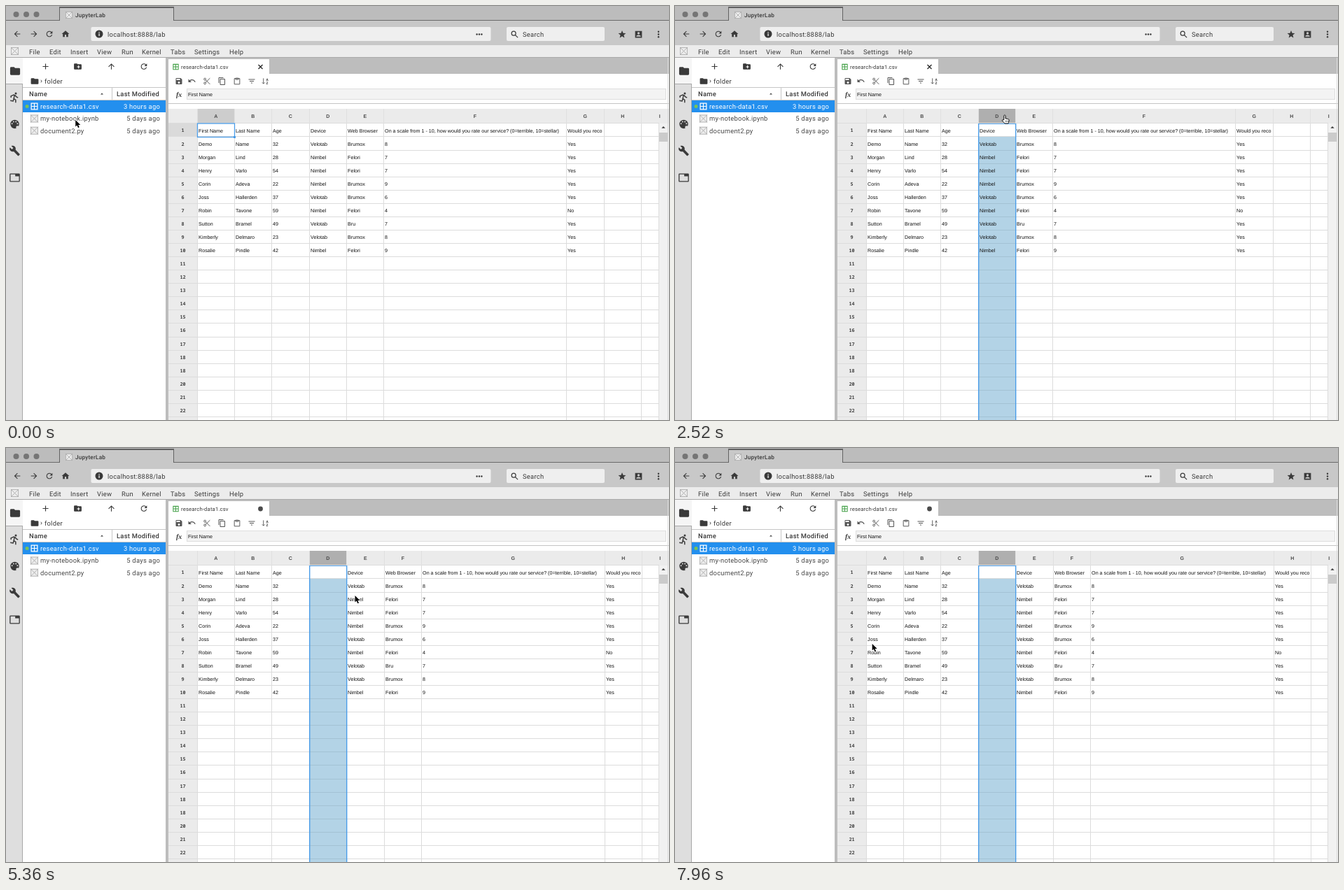
Animation, 947 px wide and 592 px high, one loop 8000 ms. Source, as an HTML page with a canvas:

```html
<!DOCTYPE html>
<html lang="en">
<head>
<meta charset="utf-8">
<title>Spreadsheet column insert</title>
<style>
html, body { margin: 0; width: 100%; height: 100%; overflow: hidden; background: #fff; }
canvas { display: block; }
</style>
</head>
<body>
<canvas id="stage" width="947" height="592"></canvas>
<script>
const ctx = document.getElementById('stage').getContext('2d');
const LOOP = 8000, STEP = 40;
const SELECT = 2240, MENU = 2640, INSERT = 5280;
const UI = 'Roboto, sans-serif';
const SHEET = '"Liberation Sans", "DejaVu Sans", sans-serif';
const MONO = '"Noto Sans Mono", monospace';
const INK = '#3a3a3a', LINE = '#dcdcdc', BLUE = '#4b9de8';

// ---------- helpers ----------
function box(x, y, w, h, color) {
  ctx.fillStyle = color;
  ctx.fillRect(x, y, w, h);
}

function frame(x, y, w, h, color, width = 1) {
  ctx.strokeStyle = color;
  ctx.lineWidth = width;
  ctx.strokeRect(x, y, w, h);
}

function round(x, y, w, h, r, color) {
  ctx.fillStyle = color;
  ctx.beginPath();
  ctx.roundRect(x, y, w, h, r);
  ctx.fill();
}

function dot(x, y, r, color) {
  ctx.fillStyle = color;
  ctx.beginPath();
  ctx.arc(x, y, r, 0, 7);
  ctx.fill();
}

// y is the middle of the capitals
function text(str, x, y, { size = 9.4, gap = 0.25, font = UI, weight = 400, color = INK, align = 'left' } = {}) {
  ctx.font = `${weight} ${size}px ${font}`;
  ctx.letterSpacing = gap + 'px';
  ctx.textAlign = align;
  ctx.fillStyle = color;
  ctx.fillText(str, x, y + size * 0.36);
}

const cellText = (str, x, y) => text(str, x, y, { size: 7.15, gap: 0, font: SHEET, color: '#111' });

// Icons live on a 24 unit grid, centred on x, y
function icon(d, x, y, size, { color = INK, stroke = 0 } = {}) {
  const path = new Path2D(d);
  ctx.save();
  ctx.translate(x - size / 2, y - size / 2);
  ctx.scale(size / 24, size / 24);
  if (stroke) {
    ctx.strokeStyle = color;
    ctx.lineWidth = stroke;
    ctx.stroke(path);
  } else {
    ctx.fillStyle = color;
    ctx.fill(path, 'evenodd');
  }
  ctx.restore();
}

function placeholder(x, y, s) {
  box(x, y, s, s, '#ececec');
  frame(x + 0.5, y + 0.5, s - 1, s - 1, '#a8a8a8', 0.8);
  ctx.beginPath();
  ctx.moveTo(x, y); ctx.lineTo(x + s, y + s);
  ctx.moveTo(x + s, y); ctx.lineTo(x, y + s);
  ctx.stroke();
}

const ICON = {
  folder: 'M10 4H4a2 2 0 0 0-2 2v12a2 2 0 0 0 2 2h16a2 2 0 0 0 2-2V8a2 2 0 0 0-2-2h-8z',
  plusFolder: 'M10 4H4a2 2 0 0 0-2 2v12a2 2 0 0 0 2 2h16a2 2 0 0 0 2-2V8a2 2 0 0 0-2-2h-8zM13 9h2v3h3v2h-3v3h-2v-3h-3v-2h3z',
  left: 'M20 11H7.8l5.6-5.6L12 4l-8 8 8 8 1.4-1.4L7.8 13H20z',
  right: 'M4 11h12.2l-5.6-5.6L12 4l8 8-8 8-1.4-1.4 5.6-5.6H4z',
  up: 'M11 20V7.8l-5.6 5.6L4 12l8-8 8 8-1.4 1.4L13 7.8V20z',
  plus: 'M11 5h2v6h6v2h-6v6h-2v-6H5v-2h6z',
  reload: 'M17.65 6.35A8 8 0 1 0 19.73 14h-2.08a6 6 0 1 1-1.42-6.22L13 11h7V4z',
  home: 'M10 20v-6h4v6h5v-8h3L12 3 2 12h3v8z',
  star: 'M12 17.3L18.2 21l-1.7-7L22 9.2l-7.2-.6L12 2 9.2 8.6 2 9.2 7.5 14l-1.7 7z',
  person: 'M3 3h18v18H3zM12 6a3 3 0 1 0 .01 0zM6 18h12v-1c0-2-4-3-6-3s-6 1-6 3z',
  search: 'M15 9.5a5.5 5.5 0 1 1-11 0a5.5 5.5 0 1 1 11 0M13.5 13.5L20.5 20.5',
  run: 'M4 12V8.5L10 6l3.5 1.5L15 10l4 2.2M11.5 7L10 14l4 3v6M10 14l-1.5 5.5-6-1.2',
  wrench: 'M22.7 19l-9.1-9.1c.9-2.3.4-5-1.5-6.9-2-2-5-2.4-7.4-1.3L9 6 6 9 1.6 4.7C.4 7.1.9 10.1 2.9 12.1c1.9 1.9 4.6 2.4 6.9 1.5l9.1 9.1c.4.4 1 .4 1.4 0l2.3-2.3c.5-.4.5-1.1.1-1.4z',
  tab: 'M3 3h18a2 2 0 0 1 2 2v14a2 2 0 0 1-2 2H3a2 2 0 0 1-2-2V5a2 2 0 0 1 2-2zM3 5v14h18V9h-8V5z',
  table: 'M2 2h20v20H2zM4.5 4.5v6.3h6.3V4.5zM13.2 4.5v6.3h6.3V4.5zM4.5 13.2v6.3h6.3v-6.3zM13.2 13.2v6.3h6.3v-6.3z',
  save: 'M17 3H5a2 2 0 0 0-2 2v14a2 2 0 0 0 2 2h14a2 2 0 0 0 2-2V7zM12 13a3 3 0 1 0 .01 0zM5 5h10v4H5z',
  undo: 'M12.5 8c-2.6 0-5 1-6.9 2.6L2 7v9h9l-3.6-3.6c1.4-1.2 3.1-1.9 5.1-1.9 3.5 0 6.5 2.3 7.6 5.5l2.4-.8C21 11 17 8 12.5 8z',
  cut: 'M9 6a3 3 0 1 1-6 0a3 3 0 1 1 6 0M9 18a3 3 0 1 1-6 0a3 3 0 1 1 6 0M8 8l13 13M8 16L21 3',
  copy: 'M3 17V2h13M7 6h13v16H7z',
  paste: 'M4 4h16v17H4zM8 3v4h8V3z',
  filter: 'M10 18h4v-2h-4zM3 6v2h18V6zM6 13h12v-2H6z',
  sort: 'M7 3v17M3 16l4 4 4-4',
  close: 'M4 4l16 16M20 4L4 20',
};

// ---------- browser ----------
function drawBrowser() {
  box(0, 0, 947, 22, '#bcbcbc');
  box(0, 20, 947, 1, '#6a6a6a');
  box(0, 21, 947, 35, '#c8c8c8');
  box(76, 1, 164, 20, '#626262');
  box(77, 3, 162, 19, '#c8c8c8');
  for (const x of [14.5, 29, 43.5]) dot(x, 12, 4, '#757575');
  placeholder(85, 8, 10);
  text('JupyterLab', 99, 13.5, { size: 8.2, gap: 0.2, weight: 500 });

  icon(ICON.left, 16, 40, 13);
  icon(ICON.right, 40, 40, 13);
  icon(ICON.reload, 62, 40, 13);
  icon(ICON.home, 85, 40, 13);
  round(121.5, 30, 571, 20, 2, '#efefef');
  dot(133, 40, 5.5, INK);
  box(132.4, 39.2, 1.3, 3.8, '#efefef');
  box(132.4, 37, 1.3, 1.3, '#efefef');
  text('localhost:8888/lab', 145, 41);
  for (let i = -1; i < 2; i++) {
    dot(676 + i * 3.4, 40.5, 1.2, INK);
    dot(932, 40.5 + i * 3.7, 1.2, INK);
  }
  round(715, 30, 140, 20, 2, '#efefef');
  icon(ICON.search, 726.5, 40.5, 13, { stroke: 2.2 });
  text('Search', 738, 40.5);
  icon(ICON.star, 880, 40.5, 13);
  icon(ICON.person, 903.5, 40.5, 13);

  box(0, 56, 947, 18, '#ececec');
  placeholder(7, 59, 11);
  const menus = { File: 33, Edit: 62, Insert: 92, View: 130, Run: 165, Kernel: 194, Tabs: 235, Settings: 269, Help: 319 };
  for (const name in menus) text(name, menus[name], 65.5);
  box(0, 73, 947, 1, '#a9a9a9');
}

// ---------- file panel ----------
function drawSidebar() {
  box(0, 74, 24, 518, '#dedede');
  box(0, 74, 24, 37, '#f5f5f5');
  box(0, 111, 23, 1, '#a9a9a9');
  box(23, 111, 1, 481, '#a9a9a9');
  icon(ICON.folder, 13, 93, 17);
  icon(ICON.run, 12.5, 131, 16, { stroke: 2.2 });
  dot(14, 125, 1.5, INK);
  dot(12.5, 169, 6.2, INK);
  for (let i = 0; i < 4; i++) {
    const a = Math.PI * (1.08 + i * 0.28);
    dot(12.5 + 4 * Math.cos(a), 169.2 + 4 * Math.sin(a), 1, '#dedede');
  }
  dot(16.5, 173.5, 2.2, '#dedede');
  icon(ICON.wrench, 12.5, 207, 16);
  icon(ICON.tab, 12.5, 245.5, 16);

  box(24, 74, 204, 518, '#fff');
  icon(ICON.plus, 56.5, 86.5, 14);
  icon(ICON.plusFolder, 102.5, 86.5, 13);
  icon(ICON.up, 150.5, 86.5, 13);
  icon(ICON.reload, 197, 86.5, 13);
  icon(ICON.folder, 41, 107.5, 13);
  text('›', 49, 107, { weight: 500 });
  text('folder', 55, 107.5);

  box(24, 116, 204, 1, '#c6c6c6');
  box(24, 134, 204, 1, '#c6c6c6');
  box(151, 117, 1, 17, '#c6c6c6');
  text('Name', 33, 125.5, { weight: 500 });
  text('Last Modified', 158, 125.5, { weight: 500 });
  icon('M4 16h16L12 8z', 137, 125.5, 6);

  box(24, 135, 204, 17, '#238fee');
  dot(30, 143.5, 2.5, '#78c257');
  icon(ICON.table, 40.5, 143.5, 12, { color: '#fff' });
  const files = [['research-data1.csv', '3 hours ago'], ['my-notebook.ipynb', '5 days ago'], ['document2.py', '5 days ago']];
  files.forEach(([name, age], i) => {
    const y = 143.8 + i * 17.2, color = i ? '#484848' : '#fff';
    if (i) placeholder(35, y - 5.5, 11);
    text(name, 49, y, { color });
    text(age, 220, y, { color, align: 'right' });
  });
}

// ---------- document ----------
function drawToolbar(edited) {
  box(228, 74, 4, 518, '#bdbdbd');
  box(232, 74, 715, 23, '#bdbdbd');
  box(232, 76, 144, 21, '#fff');
  box(232, 97, 715, 50, '#fff');
  icon(ICON.table, 242.5, 87, 10, { color: '#43a047' });
  text('research-data1.csv', 250, 87.5, { size: 7.7, gap: 0.15 });
  if (edited) dot(363.5, 87, 3.4, '#4a4a4a');
  else icon(ICON.close, 363.5, 87, 9, { stroke: 3.2, color: '#222' });

  const tint = { color: '#555' }, thin = { color: '#555', stroke: 2 };
  icon(ICON.save, 247, 107.5, 12, tint);
  icon(ICON.undo, 265.5, 107, 12, tint);
  icon(ICON.cut, 287, 107.5, 11.5, thin);
  icon(ICON.copy, 308.5, 107.5, 12, thin);
  icon(ICON.paste, 330, 107.5, 11.5, thin);
  icon(ICON.filter, 351, 107.5, 12, tint);
  icon(ICON.sort, 370, 107.5, 11, thin);
  text('A', 371.5, 104.8, { size: 4.8, gap: 0, weight: 700 });
  text('Z', 371.5, 110, { size: 4.8, gap: 0, weight: 700 });

  text('fx', 243, 126, { size: 10, gap: 0, font: '"Liberation Serif", serif', weight: 'italic 700' });
  box(258, 118, 684, 16, '#f3f3f3');
  frame(258.5, 118.5, 684, 15, '#dedede');
  text('First Name', 260, 126, { size: 7.15, gap: 0, font: SHEET, color: '#111' });
  box(232, 139, 715, 1, '#c4c4c4');
}

const ROWS = [
  'First Name|Last Name|Age|Device|Web Browser|On a scale from 1 - 10, how would you rate our service? (0=terrible, 10=stellar)|Would you reco',
  'Demo|Name|32|Velotab|Brumox|8|Yes',
  'Morgan|Lind|28|Nimbel|Felori|7|Yes',
  'Henry|Varlo|54|Nimbel|Felori|7|Yes',
  'Corin|Adeva|22|Nimbel|Brumox|9|Yes',
  'Joss|Hallerden|37|Velotab|Brumox|6|Yes',
  'Robin|Tavone|59|Nimbel|Felori|4|No',
  'Sutton|Bramel|49|Velotab|Bru|7|Yes',
  'Kimberly|Delmaro|23|Velotab|Brumox|8|Yes',
  'Rosalie|Pindle|42|Nimbel|Felori|9|Yes',
].map(row => row.split('|'));

const TOP = 168, ROW_H = 19.07;
const BEFORE = [273, 326, 379, 433, 486, 539, 800, 854, 907, 960];
const AFTER = [273, 326, 379, 433, 486, 540, 593, 855, 908, 960];
const rowLine = i => Math.round(TOP - 0.6 + i * ROW_H);
const rowMid = i => 178 + i * ROW_H;

function drawSheet(selected, inserted) {
  const cols = inserted ? AFTER : BEFORE;
  box(232, 147, 715, 445, '#fff');
  box(232, 147, 715, 21, '#ebebeb');
  box(232, 168, 41, 424, '#ebebeb');

  if (selected) {
    box(433, 147, 54, 21, '#afafaf');
    box(433, rowLine(1), 54, 592, '#b3d3e6');
  } else {
    box(273, 147, 54, 21, '#cdcdcd');
    box(232, 168, 41, 19, '#dadada');
  }

  for (let i = 0; i < 23; i++) box(232, rowLine(i), 701, 1, LINE);
  for (const x of cols) {
    box(x, 147, 1, 21, '#e0e0e0');
    box(x, 168, 1, 424, LINE);
  }
  if (selected) {
    for (let i = 2; i < 23; i++) box(433, rowLine(i), 54, 1, '#a3c2d4');
    box(433, 168, 54, 1, BLUE);
    box(433, 168, 1.4, 424, BLUE);
    box(486, 168, 1.4, 424, BLUE);
  } else {
    frame(273.5, 168, 53, 19.5, BLUE, 1.3);
    box(325, 186, 3, 3, BLUE);
  }

  [...'ABCDEFGHI'].forEach((name, i) => {
    text(name, (cols[i] + cols[i + 1]) / 2 + 0.3, 157.8,
      { size: 7, gap: 0, font: SHEET, weight: 700, align: 'center', color: '#4a4a4a' });
  });
  for (let i = 0; i < 22; i++) {
    text(i === 18 ? 18 : i + 1, 252.5, rowMid(i),
      { size: 6.8, gap: 0, font: MONO, weight: 600, align: 'center', color: '#444' });
  }

  ROWS.forEach((row, r) => row.forEach((value, c) => {
    const col = inserted && c > 2 ? c + 1 : c;
    cellText(value, cols[col] + 2.1, rowMid(r));
  }));

  box(933, 168, 14, 424, '#f1f1f1');
  box(932, 168, 1, 424, LINE);
  box(945, 74, 1, 518, '#dcdcdc');
  icon('M3 16h18L12 7z', 939, 173.5, 7);
  box(933, 181, 12, 13, '#cbcbcb');
}

function drawMenu() {
  ctx.save();
  ctx.shadowColor = 'rgba(0,0,0,.5)';
  ctx.shadowBlur = 4;
  ctx.shadowOffsetY = 1;
  box(474, 156.5, 163, 137, '#fff');
  ctx.restore();
  frame(474, 156.5, 163, 137, '#b5b5b5', 0.7);
  const groups = [
    [165.3, ['Cut', 'Copy', 'Paste']],
    [211.5, ['Insert', 'Delete', 'Clear Contents']],
    [257.5, ['Filter', 'Sort  A→Z', 'Sort  Z→A']],
  ];
  for (const [y, items] of groups) {
    items.forEach((item, i) => cellText(item, 486.5, y + i * 13.2));
  }
  ['⌘X', '⌘C', '⌘V'].forEach((key, i) =>
    text(key, 625.5, 165.3 + i * 13.2, { size: 7.15, gap: 0.4, font: SHEET, color: '#111', align: 'right' }));
  box(474, 201, 163, 1, '#e2e2e2');
  box(474, 247, 163, 1, '#e2e2e2');
}

// ---------- pointer ----------
// start, end, from, bend, to
const MOVES = [
  [-604, 1873, [50, 149], [257, 215], [464.5, 159]],
  [2240, 2640, [464.5, 159], [468, 157], [472.5, 156]],
  [3400, 4400, [472.5, 156], [479, 184], [487, 212]],
  [4640, 4880, [487, 212], [492, 211], [498.5, 211]],
  [6180, 7460, [498.5, 211], [393, 282], [273, 334]],
  [7530, 8590, [273, 334], [286, 252], [300, 170]],
];
const HAND = [[1760, MENU], [3840, 4760]];
const ARROW = new Path2D('M0 0V9.6L2.2 7.6 3.8 11.2 5.5 10.4 3.9 7H7z');
const FINGER = new Path2D('M3 7V1.2c0-1.4 2-1.4 2 0V5l3.6.8c1 .2 1.6.8 1.5 1.9L9.6 10.6 9 12H4.2L.6 8.2C0 7.4 1.2 6.6 2 7.2z');

const ease = u => u < 0.5 ? 2 * u * u : 1 - 2 * (1 - u) ** 2;

function pointerAt(t) {
  const [start, end, a, b, c] = MOVES.filter(m => t >= m[0]).pop();
  const e = ease(Math.min(1, (t - start) / (end - start)));
  return a.map((v, i) => (1 - e) ** 2 * v + 2 * e * (1 - e) * b[i] + e * e * c[i]);
}

function drawPointer(t) {
  const [x, y] = pointerAt(t);
  const hand = HAND.some(([from, to]) => t >= from && t < to);
  const path = hand ? FINGER : ARROW;
  ctx.save();
  ctx.translate(hand ? x - 4 : x, hand ? y - 0.5 : y);
  ctx.lineJoin = 'round';
  ctx.lineWidth = hand ? 1 : 1.5;
  ctx.strokeStyle = hand ? '#111' : '#fff';
  ctx.fillStyle = hand ? '#fff' : '#000';
  ctx.stroke(path);
  ctx.fill(path);
  if (hand) {
    ctx.lineWidth = 0.7;
    ctx.stroke(path);
    for (const fx of [5, 6.6, 8.2]) box(fx, 7.6, 0.6, 2.6, '#333');
  }
  ctx.restore();
}

function draw() {
  const t = Math.floor(performance.now() % LOOP / STEP) * STEP;
  const inserted = t >= INSERT;
  ctx.textRendering = 'geometricPrecision';
  drawBrowser();
  drawSidebar();
  drawToolbar(inserted);
  drawSheet(t >= SELECT, inserted);
  if (t >= MENU && !inserted) drawMenu();
  drawPointer(t);
  requestAnimationFrame(draw);
}
draw();
</script>
</body>
</html>
```
